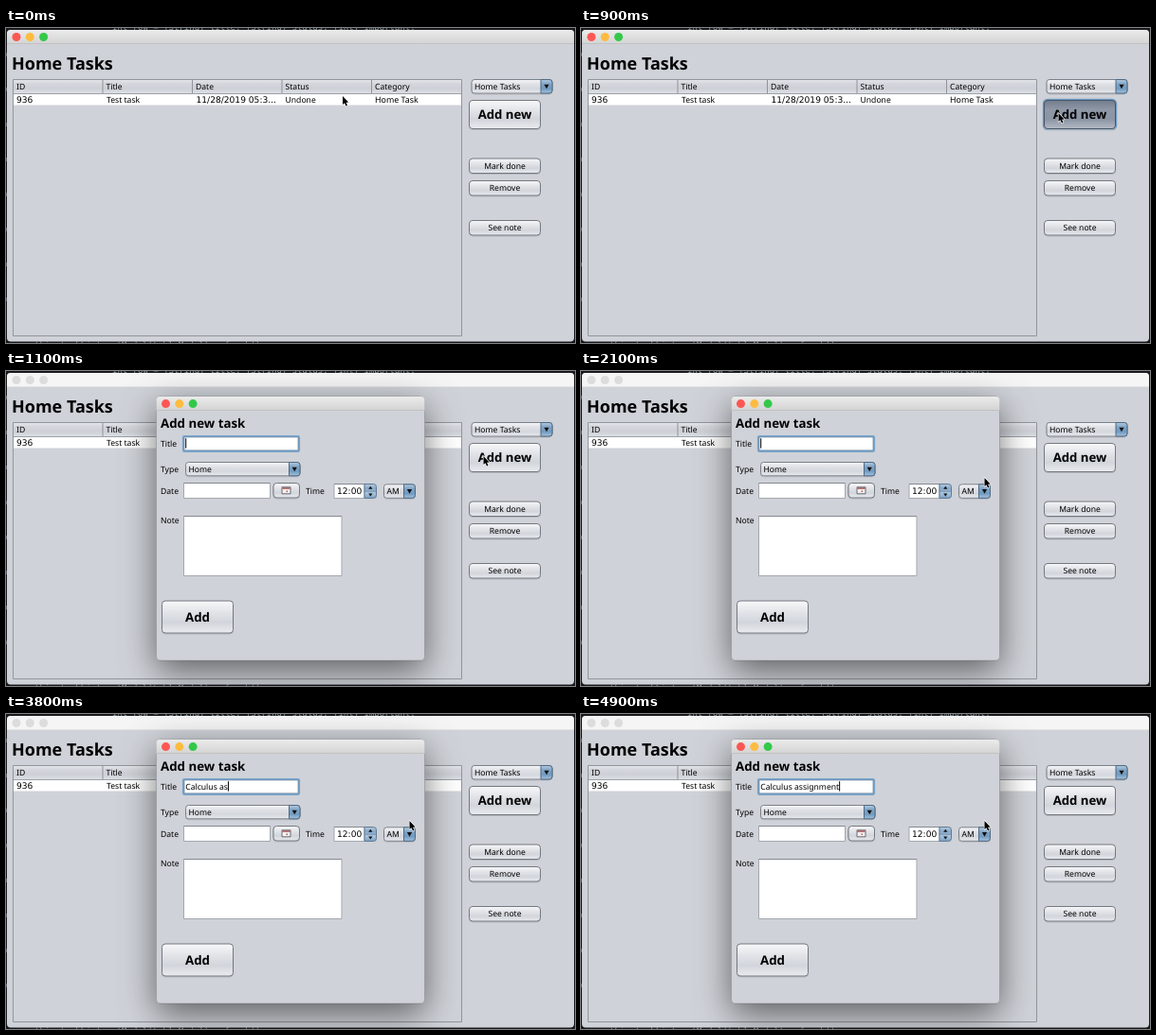
An HTML page with a canvas that plays this animation: 600 px wide and 333 px high, repeating every 5000 ms.

```html
<!DOCTYPE html>
<html>
<head>
<meta charset="utf-8">
<title>Home Tasks</title>
<style>
html, body { margin: 0; width: 100%; height: 100%; overflow: hidden; background: #17191d; }
canvas { display: block; width: 600px; height: 333px; }
</style>
</head>
<body>
<canvas></canvas>
<script>
const canvas = document.querySelector('canvas');
const dpr = window.devicePixelRatio || 1;
canvas.width = 600 * dpr;
canvas.height = 333 * dpr;
const c = canvas.getContext('2d');
c.scale(dpr, dpr);

const LOOP = 5000;
const PANEL = '#cfd2d8';
const SANS = '"Noto Sans", sans-serif';
const DIGITS = '"DejaVu Sans", sans-serif';
const TITLE = 'Calculus assignment';
// Time at which each letter of TITLE appears
const KEYS = [2400, 2500, 2700, 2900, 3000, 3300, 3400, 3500, 3600, 3800,
  3800, 4000, 4100, 4300, 4400, 4600, 4700, 4800, 4900];

function fade(y, h, ...colors) {
  const g = c.createLinearGradient(0, y, 0, y + h);
  colors.forEach((col, i) => g.addColorStop(i / (colors.length - 1), col));
  return g;
}

function box(x, y, w, h, r, fill, line, width = 1) {
  c.beginPath();
  c.roundRect(x, y, w, h, r);
  if (fill) { c.fillStyle = fill; c.fill(); }
  if (line) { c.strokeStyle = line; c.lineWidth = width; c.stroke(); }
}

function poly(fill, ...pts) {
  c.beginPath();
  for (let i = 0; i < pts.length; i += 2) c.lineTo(pts[i], pts[i + 1]);
  c.closePath();
  c.fillStyle = fill;
  c.fill();
}

function text(s, x, y, font = '8.6px ' + SANS, align = 'left', color = '#000') {
  c.font = font;
  c.textAlign = align;
  c.fillStyle = color;
  c.fillText(s, x, y);
}
const bold = px => `bold ${px}px ${SANS}`;
const number = (s, x, y) => text(s, x, y, '9.1px ' + DIGITS);

function button(label, x, y, w, h, font, pressed) {
  if (pressed) box(x - .5, y - .5, w + 1, h + 1, 4, null, '#6c98c2', 2.4);
  const fill = pressed
    ? fade(y, h, '#737d8d', '#8f98a6', '#8b95a4', '#b3bac4')
    : fade(y, h, '#f8f8fa', '#e3e5e9', '#d2d5db', '#e9ebef');
  box(x, y + 1, w, h, 3.5, null, '#b4b8be');
  box(x, y, w, h, 3.5, fill, pressed ? '#45566a' : '#737980');
  text(label, x + w / 2, y + h / 2 + (h > 20 ? 4.8 : 3.2), font, 'center');
}

function combo(label, x, y, w, h, arrow) {
  box(x, y + 1, w, h, 3, null, '#b8bcc2');
  box(x, y, w, h, 3, fade(y, h, '#f6f7f9', '#dfe1e6', '#d4d7dd', '#e8eaee'), '#7b8188');
  const ax = x + w - arrow;
  box(ax, y, arrow, h, [0, 3, 3, 0], fade(y, h, '#b4cadf', '#7fa3c5', '#719abf', '#a5c3de'), '#4f6a85');
  const mx = ax + arrow / 2, my = y + h / 2;
  poly('#111', mx - 2.6, my - 2, mx + 2.6, my - 2, mx, my + 2.6);
  text(label, x + 3, y + h / 2 + 3.2);
}

function lights(x, y, active, idle) {
  ['#fc5753', '#fdbc40', '#34c84a'].forEach((col, i) => {
    c.beginPath();
    c.arc(x + i * 14.3, y, 4.5, 0, 7);
    c.fillStyle = active ? col : idle;
    c.fill();
  });
}

function bar(x, y, w, h, active) {
  box(x, y, w, h, [4, 4, 0, 0], active ? fade(y, h, '#ebebeb', '#d3d3d3') : '#f5f5f5');
  c.fillStyle = active ? '#b7b7b9' : '#dadadc';
  c.fillRect(x, y + h - .6, w, .6);
}

function backdrop() {
  c.fillStyle = '#17191d';
  c.fillRect(0, 0, 600, 333);
  const mono = '9px "DejaVu Sans Mono", monospace';
  text('int row = (String) title, (String) status, (int) important;', 112, 1.6, mono, 'left', '#8f9a9c');
  text('this.taskList.setModel(tableModel).refresh();', 30, 338, mono, 'left', '#8b9294');
  c.fillStyle = '#777c80';
  for (let y = 26; y < 320; y += 37) c.fillRect(0, y, .7, 4);
}

function mainWindow(t) {
  const active = t < 1100;
  box(1, 2, 598, 329.5, 4, PANEL);
  bar(1, 2, 598, 15, active);
  lights(11, 9.5, active, '#dcdcdc');
  text('Home Tasks', 6, 44, bold(18));

  c.fillStyle = '#fff';
  c.fillRect(8, 70, 472, 11.5);
  c.fillStyle = fade(54, 15, '#e6e8eb', '#d3d6dc', '#cdd0d6', '#dbdee3');
  c.fillRect(8, 54.5, 472, 15);
  c.fillStyle = '#8f949b';
  c.fillRect(8, 69, 472, .8);
  for (const x of [102, 196.5, 291, 385.5]) c.fillRect(x - .5, 55, 1, 14);
  box(7.5, 54.5, 473, 271, 0, null, '#91969d');
  ['ID', 'Title', 'Date', 'Status', 'Category'].forEach((s, i) => text(s, 11 + i * 94.5, 65.2));
  number('936', 11, 79.3);
  text('Test task', 106, 79.3);
  number('11/28/2019 05:3...', 200.5, 79.3);
  text('Undone', 294.5, 79.3);
  text('Home Task', 389, 79.3, '8.9px ' + SANS);

  combo('Home Tasks', 491, 54.5, 85, 14.5, 12);
  button('Add new', 488.5, 76.5, 75, 30, bold(13.2), t >= 900 && t < 1100);
  button('Mark done', 488.5, 138, 75, 15.5);
  button('Remove', 488.5, 161.5, 75, 15.5);
  button('See note', 488.5, 203.5, 75, 15.5);
}

function field(x, y, w, h) {
  box(x, y, w, h, 0, '#fff', '#a3a8af');
  c.fillStyle = '#7d838b';
  c.fillRect(x, y - .3, w, .8);
}

function titleField(t) {
  box(187, 69, 122, 15.8, 1, '#fff', '#78a3cb', 2.2);
  box(188, 70, 120, 13.8, 0, null, '#6c7f92', .6);
  const typed = TITLE.slice(0, KEYS.filter(k => k <= t).length);
  text(typed, 189.2, 80);
  if (t >= 1600 && t < 2100) return;
  c.fillStyle = '#000';
  c.fillRect(189.2 + c.measureText(typed).width, 71.2, 1, 10.4);
}

function dialog(t) {
  const ready = t >= 1100;
  c.save();
  c.shadowColor = ready ? 'rgba(0,0,0,.55)' : 'rgba(0,0,0,.35)';
  c.shadowBlur = (ready ? 36 : 18) * dpr;
  c.shadowOffsetY = (ready ? 11 : 5) * dpr;
  box(158.5, 27, 283, 279, 4, PANEL);
  c.restore();
  box(158.5, 27, 283, 279, 4, PANEL, 'rgba(80,80,85,.45)', .7);
  bar(158.5, 27, 283, 15, ready);
  lights(168.5, 34.6, ready, '#d9d9d9');
  if (!ready) return;

  text('Add new task', 163, 59.6, bold(13.3));
  text('Title', 163, 80);
  text('Type', 163, 107);
  text('Date', 163, 129.7);
  text('Time', 316, 130.2);
  text('Note', 163, 160.8);
  titleField(t);
  combo('Home', 189.5, 96.5, 120.5, 14.3, 11.5);
  field(187.5, 118.5, 91, 16);

  button('', 282, 118.5, 27.5, 15.5);
  box(291, 122.8, 9, 7, 0, '#f5f0f0', '#5b5f6a', .9);
  c.fillStyle = '#a65a58';
  c.fillRect(291.4, 123.2, 8.2, 1.6);
  c.fillRect(295.5, 126.5, 1.6, 1.4);

  field(346, 119.5, 32, 15);
  number('12:00', 349, 130.4);
  box(378, 119.5, 12.5, 15, [0, 3, 3, 0], fade(119, 15, '#bdd0e2', '#86a8c8', '#aac4dd', '#7fa4c6'), '#607a94');
  c.fillStyle = '#607a94';
  c.fillRect(378, 126.7, 12.5, .7);
  poly('#111', 382.2, 124.8, 386.4, 124.8, 384.3, 121.8);
  poly('#111', 382.2, 129.4, 386.4, 129.4, 384.3, 132.4);
  combo('AM', 398.5, 119.8, 33, 14.5, 12);

  field(187.5, 153.5, 166.5, 63);
  button('Add', 164.5, 243, 75, 34, bold(13.3));
}

const ease = (t, a, b) => {
  const k = Math.min(1, Math.max(0, (t - a) / (b - a)));
  return k * k * (3 - 2 * k);
};

function pointer(t) {
  const a = ease(t, 0, 500), b = ease(t, 1100, 1400);
  c.save();
  c.translate(355 + 148.5 * a - 78 * b, 72 + 18 * a + 23 * b);
  c.lineJoin = 'round';
  poly('#000', 0, 0, 0, 9, 2, 7.2, 3.5, 10.6, 5, 10, 3.6, 6.7, 6.2, 6.5);
  c.strokeStyle = '#fff';
  c.lineWidth = 1.3;
  c.stroke();
  c.fill();
  c.restore();
}

function draw(now) {
  const t = Math.floor(now % LOOP / 100) * 100;
  c.textRendering = 'geometricPrecision';
  backdrop();
  mainWindow(t);
  if (t >= 1000) dialog(t);
  pointer(t);
  requestAnimationFrame(draw);
}
draw(0);
</script>
</body>
</html>
```
